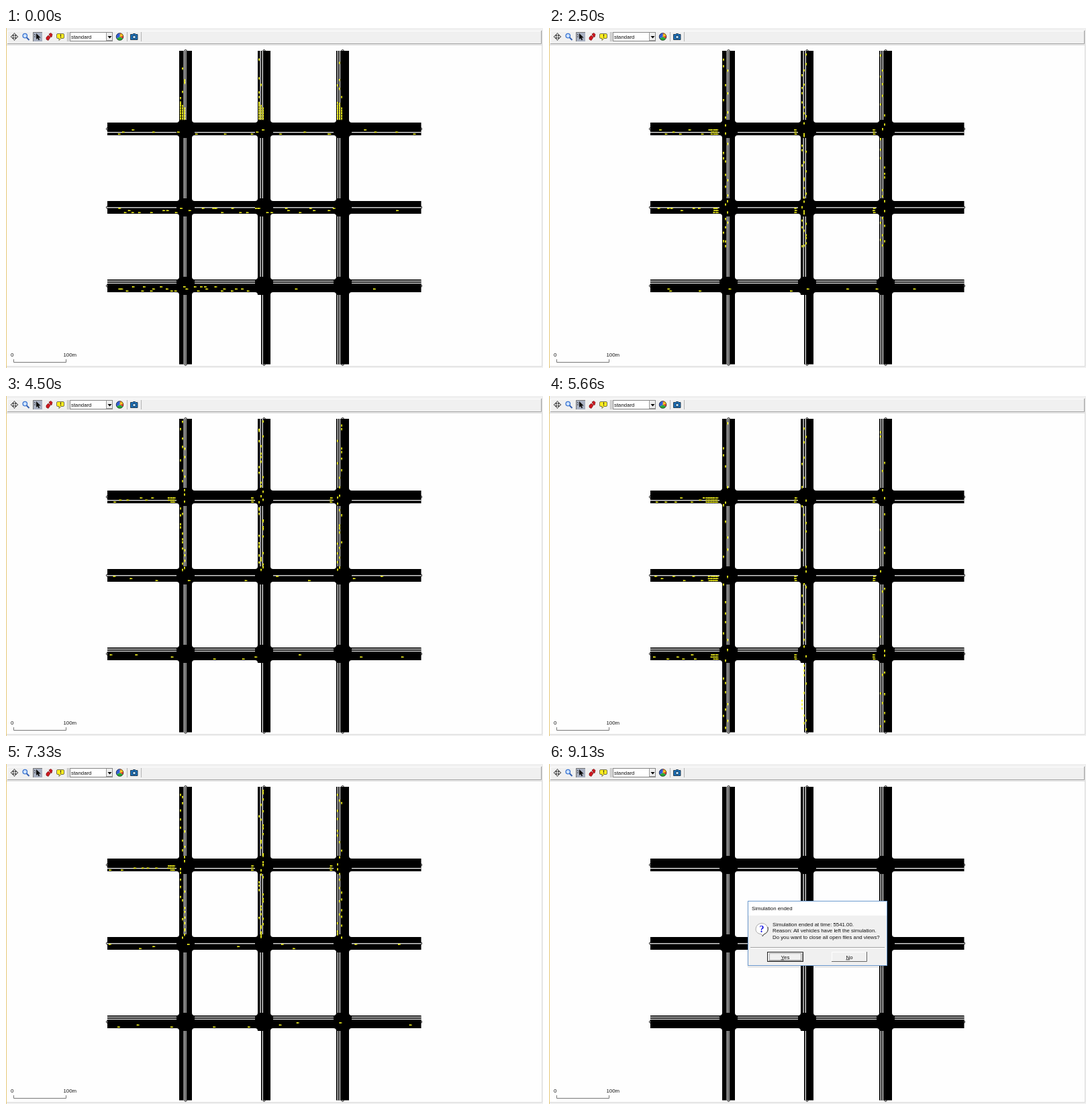
An HTML page for the animation above (9930 ms loop, 800 px wide and 507 px high).

```html
<!DOCTYPE html>
<html lang="en">
<head>
<meta charset="utf-8">
<title>Traffic grid</title>
<style>
html, body { margin: 0; width: 100%; height: 100%; overflow: hidden; background: #f0f0f0; }
svg { display: block; width: 800px; height: 507px; }
text { font: 7.84px "Liberation Sans", Arial, sans-serif; fill: #111; }
</style>
</head>
<body>
<svg viewBox="0 0 800 507">
  <rect width="800" height="507" fill="#f0f0f0"/>
  <rect x="1" y="26" width="797" height="478" fill="#fefefe"/>
  <path d="M.5 0V507" stroke="#e6c878"/>
  <path d="M1 25.5H798M1 504.5H798M798.5 3V505" stroke="#dcdcdc"/>
  <g id="bar">
    <path d="M2.5 23V4.5H797" fill="none" stroke="#fff"/>
    <path d="M2 23.5H797.5V4" fill="none" stroke="#a0a0a0"/>
    <path d="M12.500 7.500l2.500 3h-1.500v1.500h1.500v-1.500l3 2.500-3 2.500v-1.500h-1.500v1.500h1.500l-2.500 3-2.500-3h1.500v-1.500h-1.500v1.500l-3-2.500 3-2.500v1.500h1.500v-1.500h-1.500z" fill="#ddd" stroke="#222" stroke-width=".8"/>
    <path d="M30.500 14l4 4" stroke="#3560b0" stroke-width="2"/>
    <circle cx="28.300" cy="11.600" r="3.200" fill="#cfe4ff" stroke="#3973d0" stroke-width="1.300"/>
    <rect x="40" y="6" width="14" height="14" fill="#a9b1c2"/>
    <path d="M40.500 20V6.500H54" fill="none" stroke="#777"/>
    <path d="M45 8v9l2-1.800 1.500 3 1.600-.8-1.400-2.900h3z" fill="#111"/>
    <path d="M42 9l2 2M42 13h2" stroke="#333"/>
    <path d="M60 14l3-3 3 3-3 4.500-3-1.500zM64 9l3-1.500 2 2-1 4-2-.500z" fill="#d01820" stroke="#600" stroke-width=".6"/>
    <path d="M77 8.500h8q1.500 0 1.500 1.500v4q0 1.500-1.500 1.500h-3l-3 3v-3h-2q-1.500 0-1.500-1.500v-4q0-1.500 1.500-1.500z" fill="#ffee20" stroke="#554" stroke-width=".8"/>
    <path d="M81.500 9.500v3M81.500 13.300v1.200" stroke="#222" stroke-width="1.200"/>
    <path d="M91.500 6V20M93.500 6V20M180.500 6V20M201.500 6V20" stroke="#b4b4b4"/>
    <rect x="95.500" y="6.500" width="63" height="13" fill="#fff" stroke="#888"/>
    <rect x="150" y="7" width="8" height="12" fill="#eee"/>
    <path d="M149.500 19V7M150 18.500H158.500" fill="none" stroke="#999"/>
    <path d="M151.500 12h6l-3 3.500z" fill="#000"/>
    <text x="97" y="15.800">standard</text>
    <path d="M169.500 13V7.500A5.500 5.500 0 0 1 174.300 15.700z" fill="#e8352c"/>
    <path d="M169.500 13L174.300 15.700A5.500 5.500 0 0 1 164.700 15.700z" fill="#28a838"/>
    <path d="M169.500 13L164.700 15.700A5.500 5.500 0 0 1 169.500 7.500z" fill="#3060d8"/>
    <path d="M169.500 13L171 7.700A5.500 5.500 0 0 1 175 12z" fill="#f6c820"/>
    <circle cx="169.500" cy="13" r="5.300" fill="none" stroke="#222" stroke-width=".7"/>
    <path d="M185.500 9.500h3l1-1h3l1 1h2.500v8h-10.500z" fill="#1a6fb8" stroke="#123" stroke-width=".8"/>
    <circle cx="191" cy="13.500" r="2.300" fill="#bfe4ff" stroke="#012" stroke-width=".8"/>
  </g>
  <g id="roads"></g>
  <path id="cars" fill="#ffff20"/>
  <path d="M11.500 494V498.500H89.500V494" fill="none" stroke="#777"/>
  <text x="7" y="490">0</text>
  <text x="85.500" y="490">100m</text>
  <g id="box">
    <rect x="295.500" y="204" width="210" height="100" rx="2" fill="#000" opacity=".08"/>
    <rect x="296.500" y="204.500" width="207" height="96" fill="#f0f0f0" stroke="#6d9bd0"/>
    <rect x="297" y="205" width="206" height="21" fill="#fff"/>
    <text x="302" y="218">Simulation ended</text>
    <path d="M313 253q-5-2-5-7 1-8 9-8.500 8 .500 9 8.500-1 7-6 8l-2 3-1-3z" fill="#fff" stroke="#999" stroke-width=".8"/>
    <path d="M326 243q2 8-6 11l-2 3" fill="none" stroke="#444"/>
    <text x="317" y="251" text-anchor="middle" style="font:bold 14px 'Liberation Serif',serif;fill:#1414e0">?</text>
    <text x="333" y="242">Simulation ended at time: 5541.00.</text>
    <text x="333" y="251.300">Reason: All vehicles have left the simulation.</text>
    <text x="333" y="260.700">Do you want to close all open files and views?</text>
    <path d="M300 273.500H500" stroke="#a0a0a0"/>
    <path d="M300 274.500H500" stroke="#fff"/>
    <rect x="325.500" y="280.500" width="53" height="14" fill="#f0f0f0" stroke="#222"/>
    <path d="M327 293.500H377.500V282" fill="none" stroke="#999"/>
    <rect x="328.500" y="282.500" width="47" height="10" fill="none" stroke="#444" stroke-width=".8" stroke-dasharray="1 1"/>
    <path d="M421.500 294V280.500H473" fill="none" stroke="#fff"/>
    <path d="M421 294.500H473.500V280" fill="none" stroke="#666"/>
    <text x="352" y="290.500" text-anchor="middle"><tspan text-decoration="underline">Y</tspan>es</text>
    <text x="447.500" y="290.500" text-anchor="middle"><tspan text-decoration="underline">N</tspan>o</text>
  </g>
</svg>
<script>
const LOOP = 9930, END = 274, GAP = 117;
const cols = [267.5, 384.5, 501.5], rows = [150.5, 267.5, 384.5];
const el = id => document.getElementById(id);

const rect = (x, y, w, h, fill = '#000') =>
  `<rect x="${x}" y="${y}" width="${w}" height="${h}" fill="${fill}"/>`;
const ring = (x, y) =>
  `<circle cx="${x}" cy="${y}" r="1.6" fill="none" stroke="#000"/>`;

function junction(x, y) {
  const a = 9.5, b = 13.5;
  const l = x - a, r = x + a, t = y - a, u = y + a;
  return `<path d="M${x - b} ${t}Q${l} ${t} ${l} ${y - b}H${r}Q${r} ${t} ${x + b} ${t}` +
    `V${u}Q${r} ${u} ${r} ${y + b}H${l}Q${l} ${u} ${x - b} ${u}z"/>`;
}

function drawRoads() {
  const colLines = [[264.8, 267.3], [378.5, 381.7], [493.8, 496.8]];
  const rowLines = [[155], [267.2], [376.8, 379.8]];
  let s = '';
  for (const c of cols) s += ring(c, 34) + ring(c, 501.5) + rect(c - 9.5, 34, 19, 467.5);
  for (const r of rows) s += ring(151, r) + ring(618, r) + rect(151, r - 9.5, 467.5, 19);
  cols.forEach((c, i) => colLines[i].forEach(x => s += rect(x, 34, 1.2, 467.5, '#fff')));
  rows.forEach((r, i) => rowLines[i].forEach(y => s += rect(151, y, 467.5, 1.2, '#fff')));
  s += rect(375, 398, 5, 104, '#fefefe');
  for (const c of cols) for (const r of rows) s += junction(c, r);
  el('roads').innerHTML = s;
}

function seeded(seed) {
  let a = seed * 7919 + 13;
  return () => {
    a = a + 0x6D2B79F5 | 0;
    let t = Math.imul(a ^ a >>> 15, 1 | a);
    t = t + Math.imul(t ^ t >>> 7, 61 | t) ^ t;
    return ((t ^ t >>> 14) >>> 0) / 4294967296;
  };
}

// Signal cycles completed after a given step
const cycles = [[0, .9], [37, 10.15], [66, 17.3], [118, 30.21], [148, 37.53], [192, 48.21], [240, 60.1]];
function phase(k) {
  let i = 1;
  while (i < cycles.length - 1 && k > cycles[i][0]) i++;
  const [k0, c0] = cycles[i - 1], [k1, c1] = cycles[i];
  return (c0 + (c1 - c0) * (k - k0) / (k1 - k0)) % 1;
}

function traffic(k) {
  const rnd = seeded(k + 1), p = phase(k);
  const load = Math.max(0, Math.min(1, (240 - k) / 28));
  const count = n => Math.round(n * load);
  const lane = () => Math.floor(rnd() * 3);
  const f = v => v.toFixed(1);
  let d = '';

  // Triangles, wide at the rear
  const south = (c, l, y) => d += `M${f(cols[c] - 8.6 + 3 * l)} ${f(y - 1.8)}h2.2l-.6 3.6h-1z`;
  const east = (r, l, x) => d += `M${f(x - 2)} ${f(rows[r] + .6 + 3.1 * l)}v2l4-.5v-1z`;
  const spread = (n, place) => {
    for (let i = 0; i < n; i++) place((i + rnd()) / n);
  };
  const queue = (n, place) => {
    for (let i = 0; i < n; i++) place(i % 3, Math.floor(i / 3) * 3.8);
  };

  const green = p < .66;
  const front = Math.min(498, 100 + p * 760);
  for (let c = 0; c < 3; c++) {
    if (green) {
      const n = [28, 38, 26][c];
      spread(count(n), u => south(c, lane(), front - (front - 36) * u ** 1.3));
    } else {
      queue(count(6 + (p - .66) * 44), (l, q) => south(c, l, 135.5 - q));
      spread(count(7), u => south(c, lane(), 38 + 80 * Math.sqrt(u)));
    }
  }

  for (let r = 0; r < 3; r++) {
    const turn = (rows[r] - 100) / 760;
    if (green && p >= turn) {
      const size = 4 + (p - turn) * 26;
      cols.forEach((c, j) =>
        queue(count(j ? 3 : size), (l, q) => east(r, l, 251 + GAP * j - q - rnd())));
      spread(count(6), u => east(r, lane(), 155 + 75 * u));
    } else if (green) {
      spread(count(9), u => east(r, lane(), 154 + 455 * u ** 1.3));
    } else {
      const head = 250 + (p - .68) * 1600 - 120 * r;
      spread(count([14, 26, 24][r]), u => {
        const x = head - u * (450 - 130 * r);
        if (x > 153 && x < 616) east(r, lane(), x);
      });
      spread(count(4), u => east(r, lane(), 155 + 455 * u));
    }
  }
  return d;
}

let shown = -1;
function render(ms) {
  const n = Math.min(END, Math.floor((ms % LOOP + 6.8) * .03));
  if (n === shown) return;
  shown = n;
  const done = n === END;
  // Every seventh or eighth tick repeats the step before it
  const k = n - Math.max(0, Math.floor((n - 12) / 7.46 + 1));
  el('cars').setAttribute('d', done ? '' : traffic(k));
  el('box').style.display = done ? '' : 'none';
}

drawRoads();
render(0);
const start = performance.now();
(function tick() {
  render(performance.now() - start);
  requestAnimationFrame(tick);
})();
</script>
</body>
</html>
```
